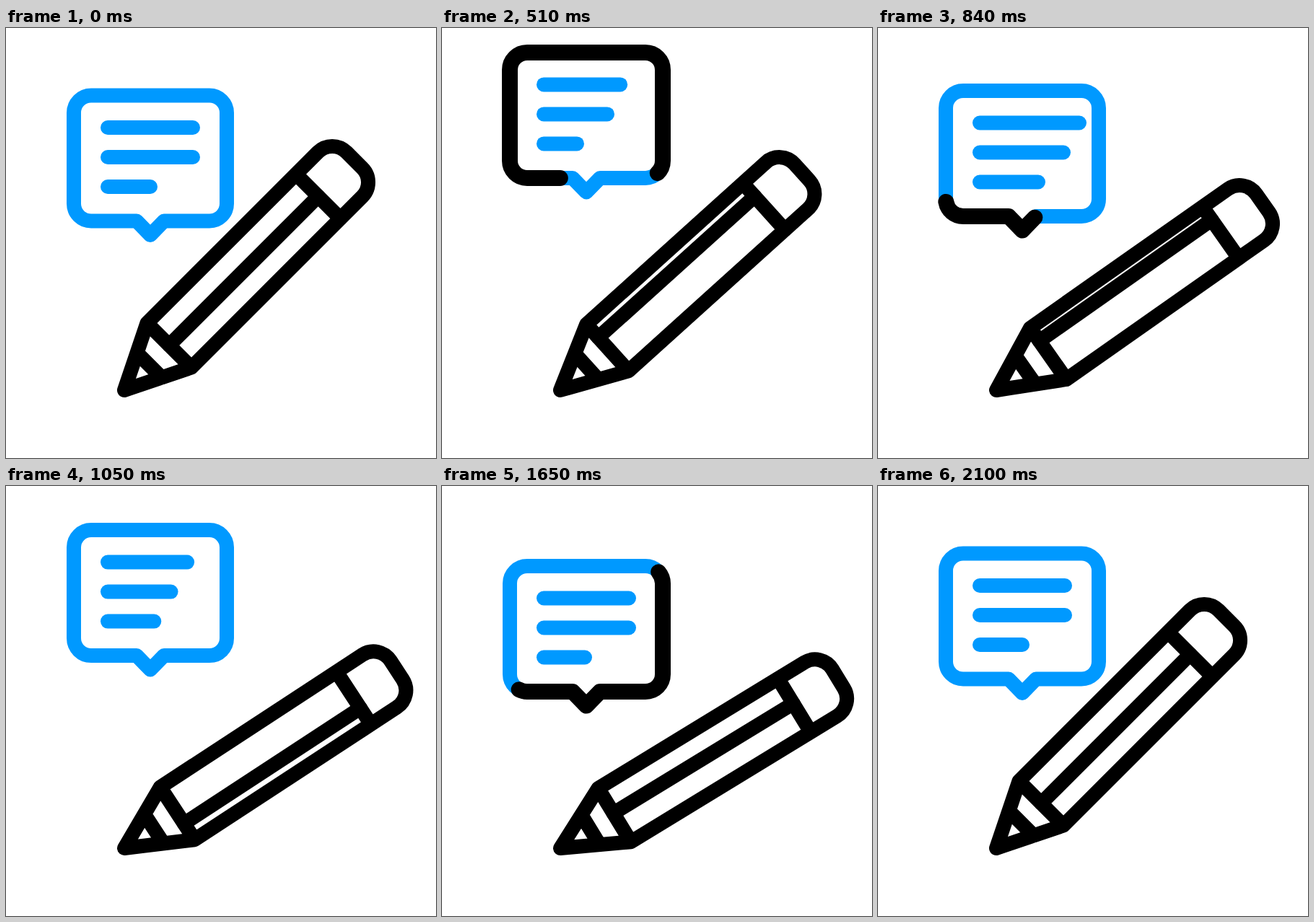
An HTML page that plays this animation: 596 px wide and 596 px high, repeating every 2250 ms.

```html
<!DOCTYPE html>
<html>
<head>
<meta charset="utf-8">
<style>
html, body { margin: 0; width: 100%; height: 100%; overflow: hidden; background: #fff; }
svg { display: block; width: 100vw; height: 100vh; }
path { fill: none; stroke-width: 20; stroke-linecap: round; stroke-linejoin: round; }
.blue { stroke: #0099ff; }
.black { stroke: #000; }
</style>
</head>
<body>
<svg viewBox="0 0 596 596">
  <g id="bubble">
    <path class="blue" id="outline" d="M200 287L181 267.5H118a24 24 0 0 1-24-24V117.5a24 24 0 0 1 24-24H282a24 24 0 0 1 24 24V243.5a24 24 0 0 1-24 24H219Z"/>
    <path class="black" id="snake" style="stroke-width:22"/>
    <path class="blue" id="line0"/>
    <path class="blue" id="line1"/>
    <path class="blue" id="line2"/>
  </g>
  <!-- the pencil lies along +x with its tip at the origin -->
  <g id="pencil" class="black">
    <path d="M0 0L88-43.5H423a28 28 0 0 1 28 28V15.5a28 28 0 0 1-28 28H88ZM88-43.5V43.5M380-43.5V43.5M49-24V24"/>
    <path id="ridge"/>
  </g>
</svg>
<script>
const $ = id => document.getElementById(id);
const END = 2100, LOOP = 2250, STEP = 30;

// Smooth curve through [time, value] points, flat at peaks.
function curve(...keys) {
  const slope = i => (keys[i + 1][1] - keys[i][1]) / (keys[i + 1][0] - keys[i][0]);
  const tangent = i => {
    if (i === 0 || i === keys.length - 1) return 0;
    const a = slope(i - 1), b = slope(i);
    return a * b > 0 ? 2 * a * b / (a + b) : 0;
  };
  return t => {
    let i = 0;
    while (i < keys.length - 2 && t > keys[i + 1][0]) i++;
    const [t0, v0] = keys[i], [t1, v1] = keys[i + 1];
    const d = t1 - t0, x = (t - t0) / d, s = x * x * (3 - 2 * x);
    return v0 + (v1 - v0) * s
      + d * x * (1 - x) * ((1 - x) * tangent(i) - x * tangent(i + 1));
  };
}

const angle = curve([0, 45], [150, 60], [330, 49.2], [540, 41.1], [690, 37.2],
  [840, 35.1], [1080, 33], [1230, 32.2], [1650, 31.4], [END, 45]);
const lift = curve([0, 0], [330, -46], [540, -60], [690, 45], [840, -6.5],
  [1080, -33], [1230, 23], [1650, 17.5], [END, 0]);
const ridge = curve([0, 0], [330, 0], [690, -38], [840, -21.5], [1230, 37],
  [1650, -3], [END, 0]);
const lineEnds = [
  curve([0, 259], [330, 244], [690, 255], [840, 279], [1230, 229], [1650, 259], [END, 259]),
  curve([0, 259], [330, 244], [690, 219], [840, 257], [1230, 206], [1650, 259], [END, 259]),
  curve([0, 200], [330, 198], [690, 177], [840, 222], [1230, 192], [1650, 198], [END, 200])
];

const snake = $('snake');
snake.setAttribute('d', $('outline').getAttribute('d'));
const total = snake.getTotalLength();
const clamp = x => Math.max(0, Math.min(1, x));

// The stroke runs round the bubble from 300 ms, and again 900 ms later.
function drawSnake(t) {
  const p = (t + 600) % 900;
  const on = t > 300 && t < END && p > 0 && p < 600;
  snake.style.display = on ? '' : 'none';
  if (!on) return;
  const head = (1 - Math.cos(Math.PI * clamp(p / 300))) / 2;
  const tail = clamp((p - 300) / 300);
  const size = (head - tail) * total;
  const shift = tail * total + 0.24 * Math.max(0, p - 25);
  snake.style.strokeDasharray = size + ' ' + (total - size);
  snake.style.strokeDashoffset = -shift;
}

function draw(now) {
  const t = Math.min(END, Math.floor(now % LOOP / STEP) * STEP);
  $('bubble').setAttribute('transform', `translate(0 ${lift(t)})`);
  $('pencil').setAttribute('transform', `translate(164 502) rotate(${-angle(t)})`);
  $('ridge').setAttribute('d', `M88 ${ridge(t)}H380`);
  lineEnds.forEach((end, i) =>
    $('line' + i).setAttribute('d', `M141 ${138 + 41 * i}H${end(t)}`));
  drawSnake(t);
}

const start = performance.now();
function tick() {
  draw(performance.now() - start);
  requestAnimationFrame(tick);
}
tick();
</script>
</body>
</html>
```
